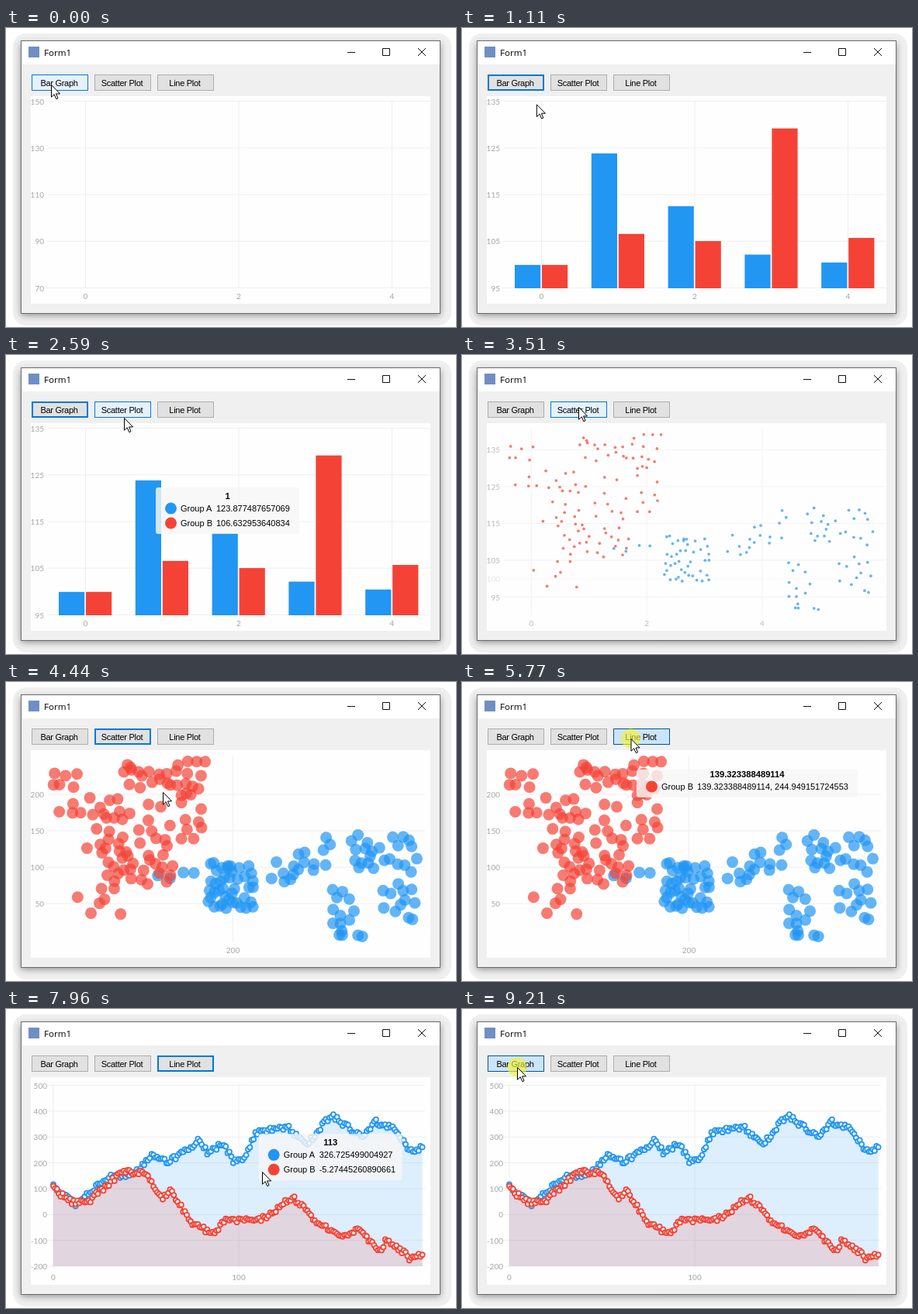
Recreate the animation shown at these times as an HTML page. Size 580 px wide and 386 px high, loop 9290 ms.

```html
<!DOCTYPE html>
<html lang="en">
<head>
<meta charset="utf-8">
<title>Form1</title>
<style>
html, body { margin: 0; width: 100%; height: 100%; overflow: hidden; background: #fff; }
svg { display: block; width: 580px; height: 386px; }
text { font-family: "Liberation Sans", Arial, sans-serif; font-size: 11px; white-space: pre; }
.title { font-family: "Open Sans", sans-serif; font-size: 11.6px; }
.label { font-family: Lato, sans-serif; font-size: 10px; fill: #a6a6a6; }
.button { letter-spacing: -.28px; text-anchor: middle; }
.head { font-weight: bold; font-size: 11.2px; text-anchor: middle; }
</style>
</head>
<body>
<svg viewBox="0 0 580 386">
  <defs>
    <filter id="soft" x="-10%" y="-10%" width="120%" height="120%"><feGaussianBlur stdDeviation="4"/></filter>
    <clipPath id="halo"><rect x="9" y="7" width="565" height="377" rx="17"/></clipPath>
    <clipPath id="panel"><rect x="32" y="88" width="515" height="268"/></clipPath>
  </defs>
  <g clip-path="url(#halo)">
    <rect width="580" height="386" fill="#efefef"/>
    <rect x="19" y="20" width="541" height="351" fill="#000" opacity=".4" filter="url(#soft)"/>
  </g>
  <rect x="19.5" y="16.5" width="540" height="352" fill="#f0f0f0" stroke="#6b6b6b"/>
  <rect x="20" y="17" width="539" height="30" fill="#fff"/>
  <rect x="29" y="24" width="14" height="14" fill="#6f8fc4"/>
  <text class="title" x="49" y="36">Form1</text>
  <path d="M440 31.5H450M485.500 26.500H494.500V35.500H485.500ZM531 26L541 36M541 26L531 36" fill="none" stroke="#111"/>
  <rect x="32" y="88" width="515" height="268" fill="#fefefe"/>
  <g id="chart" clip-path="url(#panel)"></g>
  <g id="overlay"></g>
</svg>
<script>
// All times below are in ticks: the picture is refreshed at a steady rate.
const LOOP = 9290, TICK = 78.07, LAST_TICK = 118;
const BLUE = '#2196f3', RED = '#f44336';
const chart = document.getElementById('chart');
const overlay = document.getElementById('overlay');

const mix = (a, b, p) => a + (b - a) * p;
const progress = (t, from, to) => Math.max(0, Math.min(1, (t - from) / (to - from)));
const range = (from, to, step = 1) => Array.from({ length: Math.round((to - from) / step) + 1 }, (_, i) => from + i * step);

function seeded(seed) {
  return () => (seed = (seed * 16807) % 2147483647) / 2147483647;
}

// Linear interpolation along keys of [time, ...values].
function track(keys, t) {
  const i = Math.max(1, keys.findIndex(k => k[0] >= t));
  const after = t > keys[keys.length - 1][0];
  const [a, b] = after ? keys.slice(-2) : [keys[i - 1], keys[i]];
  const p = progress(t, a[0], b[0]);
  return a.slice(1).map((v, k) => mix(v, b[k + 1], p));
}

const pointer = [[13, 58, 73], [19, 285, 225], [22, 196, 207], [23, 196, 207], [26, 240, 235], [30, 230, 225],
  [33, 152, 81], [35, 150, 67], [56, 150, 67], [57, 202, 142], [63, 225, 190], [68, 236, 172], [72, 217.5, 73],
  [91, 217.5, 73], [94, 228, 170], [96, 150, 195], [101, 350, 215], [104, 290, 200], [106, 290, 200], [115, 71, 75]];

// Data
const groupA = [100, 123.877487657069, 112.561837204915, 102.204917365128, 100.519273846051];
const groupB = [100, 106.632953640834, 105.104382917756, 129.218460357294, 105.773918264507];

// Jittered line through its main turning points [index, y].
function wander(turns, seed) {
  const rand = seeded(seed);
  return range(0, 199).map(i => track(turns, i)[0] + (rand() - .5) * 7);
}
const lineA = wander([[0, 230], [12, 251], [30, 217], [44, 212], [53, 187], [62, 198], [79, 169], [83, 185],
  [92, 173], [97, 197], [102, 196], [109, 160], [126, 152], [137, 175], [150, 136], [167, 168], [173, 145],
  [183, 154], [193, 184], [199, 178]], 71);
const lineB = wander([[0, 232], [10, 249], [20, 246], [38, 209], [50, 213], [59, 246], [63, 233], [75, 278],
  [86, 289], [93, 273], [115, 270], [129, 242], [142, 275], [155, 293], [165, 284], [176, 312], [180, 297],
  [193, 323], [199, 315]], 503);
const lineX = i => 61 + i * 2.39;

// Evenly spread dots in regions [x0, y0, x1, y1, count]: each dot is the roomiest of three tries.
function scatter(regions, seed) {
  const rand = seeded(seed), dots = [];
  const room = ([x, y]) => Math.min(20, ...dots.map(d => Math.hypot(d[0] - x, d[1] - y)));
  for (const [x0, y0, x1, y1, count] of regions) {
    for (let i = 0; i < count; i++) {
      const tries = range(1, 3).map(() => [mix(x0, x1, rand()), mix(y0, y1, rand())]);
      dots.push(tries.sort((a, b) => room(b) - room(a))[0]);
    }
  }
  return dots;
}
const redDots = scatter([[61, 115, 99, 173, 10], [104, 149, 160, 222, 22], [130, 222, 215, 262, 23],
  [148, 106, 226, 137, 17], [160, 150, 214, 220, 10], [214, 102, 257, 210, 20], [86, 265, 151, 301, 7]], 907);
const blueDots = scatter([[194, 243, 243, 256, 4], [260, 232, 319, 292, 42], [339, 220, 400, 258, 13],
  [404, 200, 421, 245, 4], [445, 197, 533, 246, 24], [486, 260, 529, 307, 12], [421, 265, 449, 312, 9],
  [428, 300, 434, 328, 4], [450, 327, 469, 329, 2]], 4421);

// Axes
const scale = (v0, p0, v1, p1) => v => p0 + (v - v0) * (p1 - p0) / (v1 - v0);
const axes = (xs, x, ys, y, labelX, right) => ({ xs, x, ys, y, labelX, right });
const emptyAxes = axes([0, 2, 4], scale(0, 102.5, 4, 497.5), range(70, 150, 20), scale(70, 335.5, 150, 94.5), 49, 547);
const barAxes = axes([0, 2, 4], emptyAxes.x, range(95, 135, 10), scale(95, 335.5, 135, 94.5), 49, 547);
const dotAxes = axes([200], scale(0, 50, 200, 292.5), range(50, 200, 50), scale(50, 286, 200, 145), 49, 540);
const lineAxes = axes([0, 100], scale(0, 61, 100, 300), range(-200, 500, 100), scale(-200, 332, 500, 98.5), 53, 540);

function drawAxes(from, to, p) {
  const layer = (a, opacity) => {
    if (!opacity) return '';
    let s = `<g opacity="${opacity}">`;
    for (const v of a.ys) {
      const y = mix(from.y(v), to.y(v), p);
      s += `<path d="M53 ${y}H${a.right}" stroke="#efefef"/><text class="label" text-anchor="end" x="${a.labelX}" y="${y + 4}">${v}</text>`;
    }
    for (const v of a.xs) {
      const x = mix(from.x(v), to.x(v), p);
      s += `<path d="M${x} 95V336" stroke="#efefef"/><text class="label" text-anchor="middle" x="${x}" y="350">${v}</text>`;
    }
    return s + '</g>';
  };
  return layer(from, 1 - p) + layer(to, p);
}

function drawBars(p, lit) {
  const series = (values, left, color) => values.map((v, i) => {
    const h = (v - 95) * 6.03 * p;
    return `<rect x="${left + 98.8 * i}" y="${336 - h}" width="33.2" height="${h}" fill="${color}" opacity="${i === lit ? .8 : 1}"/>`;
  }).join('');
  return series(groupA, 68, BLUE) + series(groupB, 103, RED);
}

function drawDots(p) {
  const series = (dots, color) => `<g fill="${color}" fill-opacity=".7">` +
    dots.map(([x, y]) => `<circle cx="${x}" cy="${y}" r="${7.5 * p}"/>`).join('') + '</g>';
  return series(blueDots, BLUE) + series(redDots, RED);
}

function drawLines(p) {
  const series = (heights, color) => {
    const points = heights.map((y, i) => [lineX(i), mix(332, y, p)]);
    const path = 'M' + points.map(q => q.join(' ')).join('L');
    return `<path d="${path}V332H61Z" fill="${color}" fill-opacity=".15"/>` +
      `<path d="${path}" fill="none" stroke="${color}" stroke-width="2"/>` +
      `<g fill="#fff" stroke="${color}" stroke-width="1.8">` +
      points.map(([x, y]) => `<circle cx="${x}" cy="${y}" r="3"/>`).join('') + '</g>';
  };
  return series(lineA, BLUE) + series(lineB, RED);
}

// Tooltips
const tipRow = (y, color, name, value) => `<circle cx="19.5" cy="${y}" r="7.5" fill="${color}"/>
  <text x="32" y="${y + 4}">${name}</text><text x="78" y="${y + 4}">${value}</text>`;

const tipBox = ([x, y], w, h, titleY, title, rows) => `<g transform="translate(${x} ${y})">
  <rect width="${w}" height="${h}" rx="3" fill="#f7f7f7" opacity=".82"/>
  <text class="head" x="${w / 2}" y="${titleY}">${title}</text>${rows}</g>`;

const pairTip = (at, index, a, b) => tipBox(at, 185, 60, 15, index,
  tipRow(27, BLUE, 'Group A', a.toPrecision(15)) + tipRow(46, RED, 'Group B', b.toPrecision(15)));

const pointTip = (at, x, y) => tipBox(at, 285, 36, 10, x, tipRow(22, RED, 'Group B', `${x}, ${y}`));

const barTip = [[18, 280, 190], [22, 189, 167], [23, 189, 167], [26, 225, 203], [31, 225, 203], [33, 193, 171], [34, 189, 167]];
const dotTip = [[58, 226, 130], [64, 230, 205], [69, 233, 145], [71, 225, 113]];
const lineTip = [[96, 82, 122], [101, 350, 150], [104, 277, 184], [107, 277, 184], [109, 268, 186]];

function drawTip(t) {
  if (t >= 18 && t < 43) {
    const i = t < 21 ? 2 : 1;
    return pairTip(track(barTip, t), i, groupA[i], groupB[i]);
  }
  if (t >= 58 && t < 76) {
    const at = track(dotTip, t);
    if (t >= 68) return pointTip(at, '139.323388489114', '244.949151724553');
    const [px, py] = track(pointer, t);
    return pointTip(at, ((px - 50) / 1.2125).toPrecision(15), (50 + (286 - py) / .94).toPrecision(15));
  }
  if (t >= 96 && t < 118) {
    const i = Math.round((track(pointer, Math.min(t, 106))[0] - 61) / 2.39);
    const value = y => (265.3 - y) / .33357;
    return pairTip(track(lineTip, t), i, value(lineA[i]), value(lineB[i]));
  }
  return '';
}

// Buttons and pointer
const isPressed = t => t === 38 || t === 74 || t === 75 || t >= 117;

function drawButtons(t, [px, py]) {
  const focus = t < 38 || t >= 117 ? 0 : t < 74 ? 1 : 2;
  return ['Bar Graph', 'Scatter Plot', 'Line Plot'].map((name, i) => {
    const x = 33 + 81 * i;
    const hover = px >= x && px <= x + 73 && py >= 60 && py <= 81;
    const [fill, edge] = hover && isPressed(t) ? ['#cce4f7', '#005499']
      : hover ? ['#e5f1fb', '#0078d7']
      : ['#e1e1e1', focus === i ? '#0078d7' : '#adadad'];
    const w = !hover && focus === i ? 2 : 1;
    return `<rect x="${x + w / 2}" y="${60 + w / 2}" width="${73 - w}" height="${21 - w}" fill="${fill}" stroke="${edge}" stroke-width="${w}"/>
      <text class="button" x="${x + 35.5}" y="75">${name}</text>`;
  }).join('');
}

function drawPointer(t, [x, y]) {
  const glow = isPressed(t) ? `<circle cx="${x}" cy="${y}" r="12.5" fill="#f2f236" opacity=".65"/>` : '';
  return glow + `<path transform="translate(${x} ${y})" d="M.5 .5V16.200L4.200 12.700L6.800 18.700L9 17.700L6.500 11.900H11.600Z" fill="#fff" stroke="#000"/>`;
}

function drawChart(t) {
  if (t < 45) {
    const p = progress(t, 3, 8);
    const lit = t >= 24 && t < 32 ? 1 : t >= 18 && t < 21 ? 2 : -1;
    return drawAxes(emptyAxes, barAxes, p) + (t < 39 ? drawBars(p, lit) : '');
  }
  if (t < 83) {
    const p = progress(t, 44, 48);
    return drawAxes(barAxes, dotAxes, p) + (t < 76 ? drawDots(p) : '');
  }
  const p = progress(t, 82, 87);
  return drawAxes(dotAxes, lineAxes, p) + drawLines(p);
}

let shown = -1;
function frame() {
  const t = Math.min(LAST_TICK, Math.floor(performance.now() % LOOP / TICK + .3));
  if (t !== shown) {
    shown = t;
    const at = track(pointer, t);
    chart.innerHTML = drawChart(t);
    overlay.innerHTML = drawButtons(t, at) + drawTip(t) + drawPointer(t, at);
  }
  requestAnimationFrame(frame);
}
frame();
</script>
</body>
</html>
```
